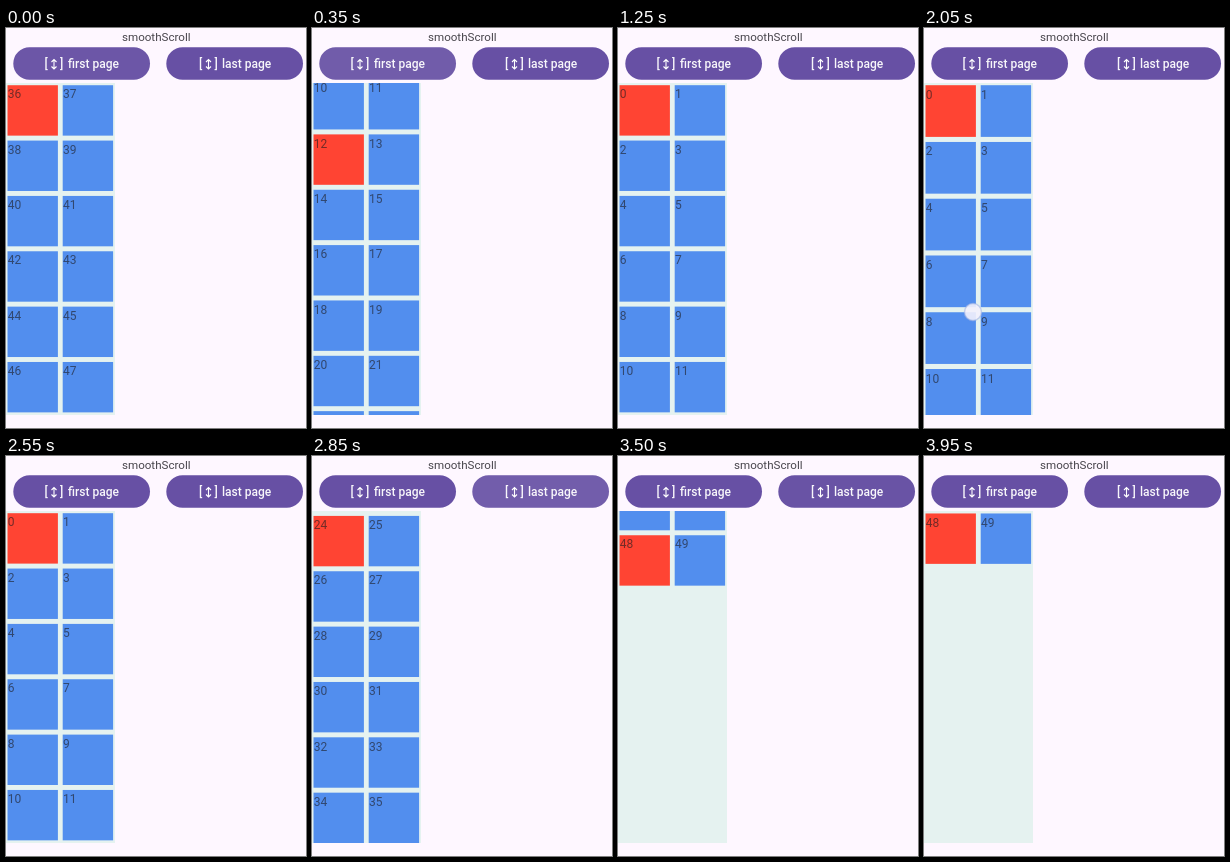
These frames come from a looping animation (300x400 px, 4300 ms). An HTML page:

```html
<!DOCTYPE html>
<html lang="en">
<head>
<meta charset="utf-8">
<title>smoothScroll</title>
<style>
  html, body { margin: 0; width: 100%; height: 100%; overflow: hidden; background: #fef7ff; }
  svg { display: block; width: 100vw; height: 100vh; font-family: Roboto, "Open Sans", sans-serif; }
  .title { font-size: 11.6px; fill: #48454c; }
  .label { font-size: 12px; fill: #1d1b20; fill-opacity: .62; }
  .caption { font-size: 12px; font-weight: 500; fill: #fff; fill-opacity: .95; }
  .arrow { fill: none; stroke: #fff; stroke-width: 1.1; }
</style>
</head>
<body>
<svg id="stage" viewBox="0 0 300 400">
  <defs><clipPath id="viewport"><rect y="55" width="109" height="332"/></clipPath></defs>
  <rect width="300" height="400" fill="#fef7ff"/>
  <text class="title" x="150.3" y="12.6" text-anchor="middle">smoothScroll</text>
  <g id="buttons"></g>
  <rect y="55" width="109" height="332" fill="#e5f2f0"/>
  <g clip-path="url(#viewport)"><g id="grid"></g></g>
  <circle id="touch" r="8.5" fill="#f3f1fc" fill-opacity=".9" stroke="#a3b6e4" stroke-opacity=".6" stroke-width="1.5"/>
</svg>
<script>
const LOOP = 4300, ITEMS = 50, PAGE = 12;
const TOP = 55, PITCH = 55.35, CELL = 50.4;
const START = 18 * PITCH, END = 24 * PITCH;

const byId = id => document.getElementById(id);

function add(parent, name, attrs, text = '') {
  const node = document.createElementNS('http://www.w3.org/2000/svg', name);
  for (const key in attrs) node.setAttribute(key, attrs[key]);
  node.textContent = text;
  parent.appendChild(node);
  return node;
}

function addButton(x, iconX, textX, caption) {
  const g = byId('buttons');
  const pill = { x, y: 19.2, width: 136.7, height: 32.6, rx: 16.3 };
  add(g, 'rect', { ...pill, fill: '#6750a4' });
  const ripple = add(g, 'rect', { ...pill, fill: '#fff' });
  add(g, 'text', { class: 'caption', x: iconX - 9.5, y: 40.3 }, '[');
  add(g, 'path', { class: 'arrow', d: `M${iconX} 31.5v9.5m-2.5 -7l2.5 -2.5l2.5 2.5m-5 4.5l2.5 2.5l2.5 -2.5` });
  add(g, 'text', { class: 'caption', x: iconX + 6, y: 40.3 }, ']');
  add(g, 'text', { class: 'caption', x: textX, y: 40.3 }, caption);
  return ripple;
}

const firstRipple = addButton(7.3, 48, 62, 'first page');
const lastRipple = addButton(160.3, 202.5, 216, 'last page');

for (let i = 0; i < ITEMS; i++) {
  const x = 1.5 + (i % 2) * 55.2;
  const y = TOP + 2.2 + Math.floor(i / 2) * PITCH;
  add(byId('grid'), 'rect', { x, y, width: CELL, height: CELL, fill: i % PAGE ? '#528eee' : '#ff4433' });
  add(byId('grid'), 'text', { class: 'label', x: x + .3, y: y + 13.2 }, i);
}

// Linear interpolation through [time, value] pairs.
function track(t, keys) {
  if (t <= keys[0][0]) return keys[0][1];
  for (let i = 1; i < keys.length; i++) {
    const [t0, v0] = keys[i - 1], [t1, v1] = keys[i];
    if (t < t1) return v0 + (v1 - v0) * (t - t0) / (t1 - t0);
  }
  return keys[keys.length - 1][1];
}

// Distance left on a critically damped spring.
const spring = x => (1 + x) * Math.exp(-x);

function scrollAt(t) {
  if (t < 1250) return START * spring(track(t, [[0, 0], [650, 4.66], [1250, 11]]));
  return END * (1 - spring(track(t, [[2610, 0], [2850, 1.666], [3200, 3.71], [3700, 7.6], [3950, 11]])));
}

function render(t) {
  const stretch = 1 + track(t, [[1550, 0], [1700, .013], [2050, .0255], [2150, .0255], [2300, .008], [2550, 0]]);
  byId('grid').setAttribute('transform',
    `translate(0 ${TOP + 2}) scale(1 ${stretch}) translate(0 ${-TOP - 2 - scrollAt(t)})`);

  const touch = byId('touch');
  touch.setAttribute('cx', track(t, [[1500, 46], [2050, 49]]));
  touch.setAttribute('cy', track(t, [[1550, 130], [1750, 210], [2050, 284], [2150, 290]]));
  touch.setAttribute('visibility', t >= 1500 && t < 2150 ? 'visible' : 'hidden');

  firstRipple.setAttribute('opacity', track(t, [[0, .03], [150, .08], [650, .05], [1100, 0]]));
  lastRipple.setAttribute('opacity', track(t, [[2600, 0], [2750, .08], [3200, .05], [3650, 0]]));
}

const began = performance.now();
function tick() {
  render((performance.now() - began) % LOOP);
  requestAnimationFrame(tick);
}
render(0);
requestAnimationFrame(tick);
</script>
</body>
</html>
```
